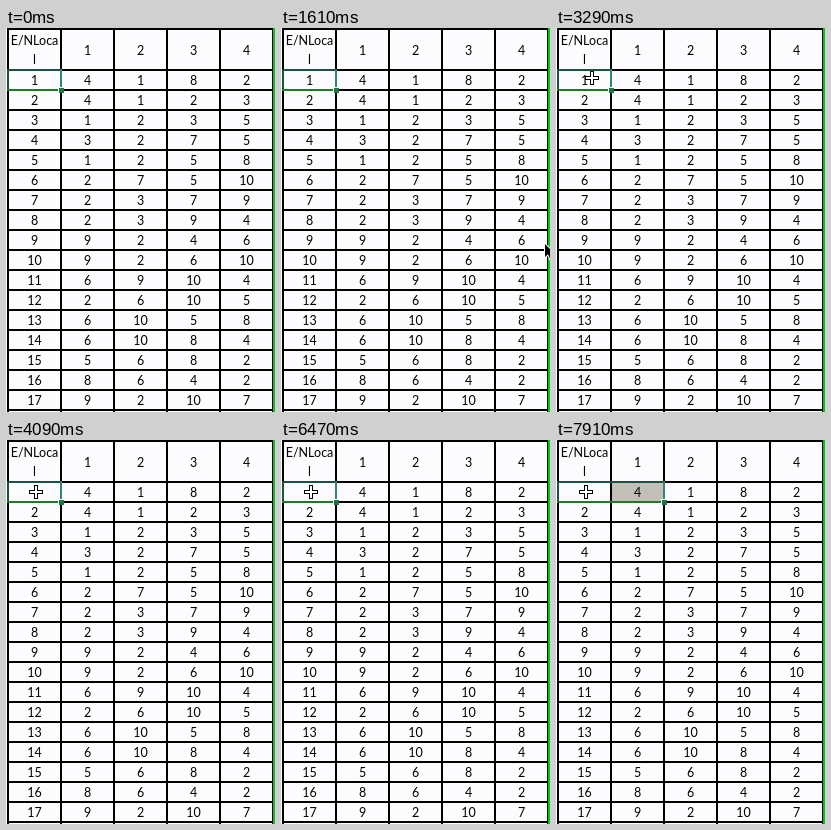
Recreate the animation shown at these times as an HTML page with a canvas. Size 269 by 384 pixels, loop 8000 ms.

```html
<!DOCTYPE html>
<html lang="en">
<head>
<meta charset="utf-8">
<title>Table selection</title>
<style>
  html, body { margin: 0; width: 100%; height: 100%; overflow: hidden; background: #fcfcfe; }
  canvas { display: block; width: 100vw; height: 100vh; }
</style>
</head>
<body>
<canvas id="stage" width="269" height="384"></canvas>
<script>
const ctx = document.getElementById('stage').getContext('2d');
const LOOP = 8000, SELECT_AT = 7500, SELECT_TIME = 100;
const GREEN = '#217346', PAPER = '#fcfcfe';
const rows = [
  '4 1 8 2', '4 1 2 3', '1 2 3 5', '3 2 7 5', '1 2 5 8', '2 7 5 10',
  '2 3 7 9', '2 3 9 4', '9 2 4 6', '9 2 6 10', '6 9 10 4', '2 6 10 5',
  '6 10 5 8', '6 10 8 4', '5 6 8 2', '8 6 4 2', '9 2 10 7'
].map((row, i) => [i + 1, ...row.split(' ')]);
const columnLeft = i => 1 + 53 * i;
const columnCenter = i => columnLeft(i) + 27.5;
const rowTop = i => 42 + 20 * i;

// Pointer path: time, x, y
const path = [
  [1590, 264, 216], [1710, 264, 216], [2450, 54, 70], [2590, 54, 70],
  [3050, 36, 50], [3390, 36, 50], [4090, 30, 52], [LOOP, 30, 52]
];
const CROSS_FROM = 2700;

const clamp = v => Math.max(0, Math.min(1, v));
const ease = v => v * v * (3 - 2 * v);

function pointerAt(time) {
  const next = path.findIndex(point => point[0] > time);
  if (next < 1) return null;
  const [t0, x0, y0] = path[next - 1], [t1, x1, y1] = path[next];
  const k = ease((time - t0) / (t1 - t0));
  return [x0 + (x1 - x0) * k, y0 + (y1 - y0) * k];
}

function box(color, x, y, w, h) {
  ctx.fillStyle = color;
  ctx.fillRect(x, y, w, h);
}

function drawTable() {
  ctx.fillStyle = '#000';
  ctx.font = '12.5px Lato, Carlito, sans-serif';
  ctx.textAlign = 'center';
  ctx.textBaseline = 'alphabetic';
  ctx.fillText('E/NLoca', columnCenter(0), 17);
  ctx.fillText('l', columnCenter(0), 36);
  for (let i = 1; i < 5; i++) ctx.fillText(i, columnCenter(i), 27);
  rows.forEach((row, r) =>
    row.forEach((value, c) => ctx.fillText(value, columnCenter(c), rowTop(r) + 15)));

  for (let c = 0; c < 6; c++) box('#000', columnLeft(c), 1, 2, 383);
  box('#000', 1, 0, 267, 2);
  for (let r = 0; r <= rows.length; r++) box('#000', 1, rowTop(r) - 1, 267, 2);
  box('#00c814', 267, 0, 2, 384);
}

function drawSelection(right) {
  box('#1d5040', 1, 41, right, 2);
  box('#1d5040', 1, 41, 2, 22);
  box('#2f8577', right - 1, 41, 2, 22);
  box('#1f7a26', 1, 61, right, 2);
  box(PAPER, right - 3, 59, 6, 6);
  box(GREEN, right - 2, 60, 5, 5);
}

function polygon(points, fill, stroke, width) {
  ctx.beginPath();
  points.forEach(([x, y]) => ctx.lineTo(x, y));
  ctx.closePath();
  ctx.lineWidth = width;
  ctx.strokeStyle = stroke;
  ctx.stroke();
  ctx.fillStyle = fill;
  ctx.fill();
}

function drawArrow() {
  polygon([[0, 0], [0, 13], [3, 10.3], [5.3, 15.5], [7.6, 14.5], [5.3, 9.5], [9.3, 9.3]],
    '#000', '#fff', 2);
}

function drawCross() {
  const a = 1, b = 6;
  const plus = [[-a, -b], [a, -b], [a, -a], [b, -a], [b, a], [a, a],
    [a, b], [-a, b], [-a, a], [-b, a], [-b, -a], [-a, -a]];
  polygon(plus, '#fff', '#000', 2);
}

function draw(time) {
  const grow = ease(clamp((time - SELECT_AT) / SELECT_TIME));
  const right = columnLeft(1) + 1 + 53 * grow;
  box(PAPER, 0, 0, 269, 384);
  if (grow) box('#c3beb6', columnLeft(1), 42, 53 * grow, 20);
  drawTable();
  drawSelection(right);

  const pointer = pointerAt(time);
  if (!pointer) return;
  ctx.save();
  ctx.translate(Math.round(pointer[0]), Math.round(pointer[1]));
  if (time < CROSS_FROM) drawArrow();
  else {
    box(PAPER, -5, -5, 10, 10);
    drawCross();
  }
  ctx.restore();
}

const start = performance.now();
function tick() {
  draw((performance.now() - start) % LOOP);
  requestAnimationFrame(tick);
}
tick();
</script>
</body>
</html>
```
